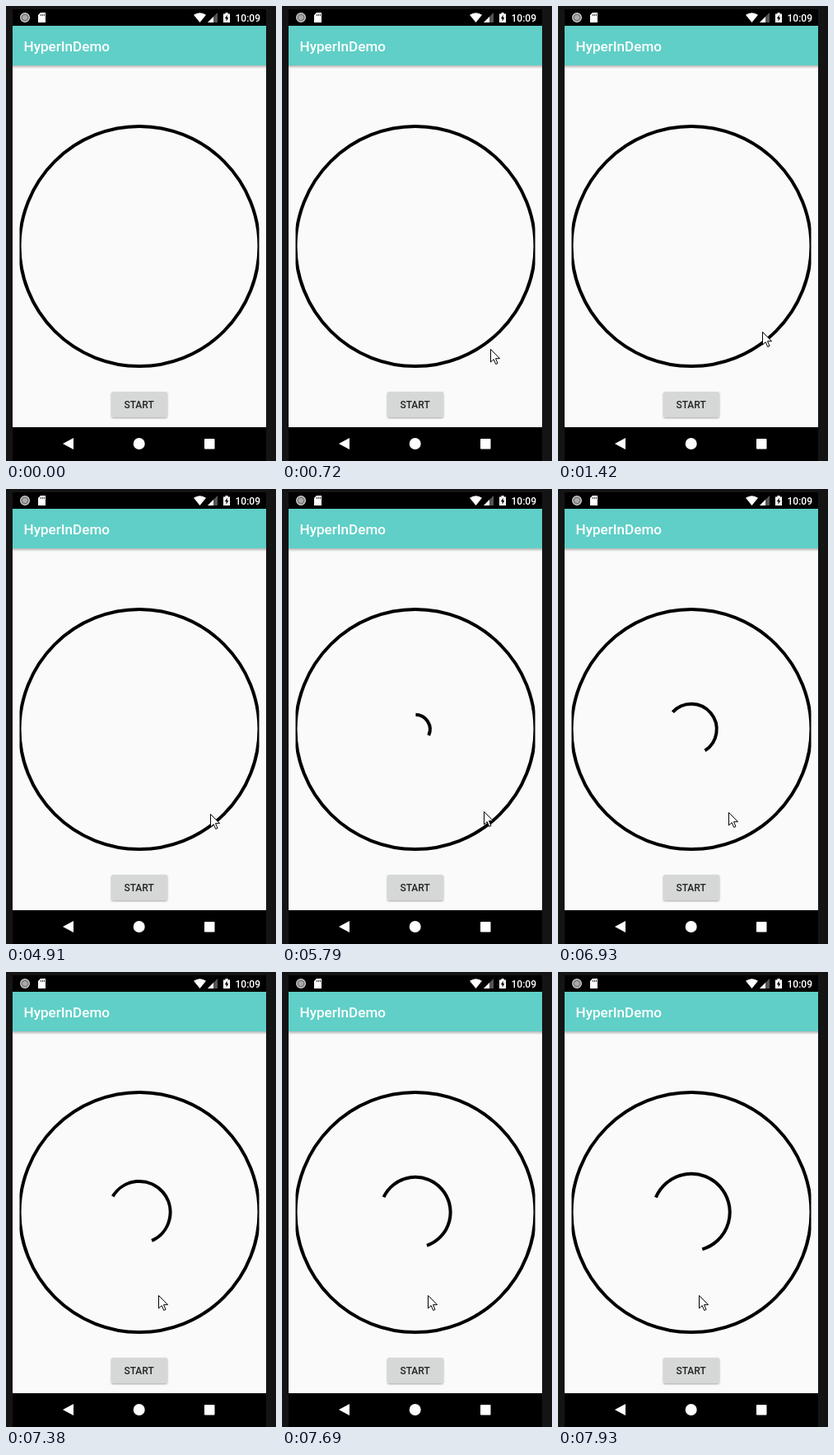
Animation of 328x552 px, one loop 8 s. Source, as an HTML page:

```html
<!DOCTYPE html>
<html lang="en">
<head>
<meta charset="utf-8">
<style>
  html, body { margin: 0; width: 100%; height: 100%; overflow: hidden; background: #141414; }
  svg { display: block; }
  text { font-family: Roboto, sans-serif; font-weight: 500; }
</style>
</head>
<body>
<svg width="328" height="552" viewBox="0 0 328 552">
  <defs>
    <linearGradient id="shade" x2="0" y2="1">
      <stop stop-color="#000" stop-opacity=".28"/>
      <stop offset="1" stop-color="#000" stop-opacity="0"/>
    </linearGradient>
    <filter id="lift" x="-10%" y="-20%" width="120%" height="150%">
      <feDropShadow dx="0" dy="1" stdDeviation=".9" flood-opacity=".35"/>
    </filter>
    <clipPath id="view"><rect x="16.5" y="140" width="291" height="303"/></clipPath>
  </defs>

  <rect width="328" height="552" fill="#141414"/>
  <rect x="8" y="4" width="308" height="548"/>
  <rect x="8" y="72" width="308" height="439" fill="#fafafa"/>
  <rect x="8" y="72" width="308" height="4" fill="url(#shade)"/>
  <rect x="8" y="24" width="308" height="48" fill="#5fcfc7"/>
  <text x="21.5" y="55" font-size="17.1" fill="#fff">HyperInDemo</text>

  <!-- status bar -->
  <circle cx="23" cy="14" r="5.3" fill="#777" stroke="#ccc" stroke-width="1.4"/>
  <circle cx="23" cy="14" r="3" fill="#aaa"/>
  <path d="M42 8H48V20H39V11Z" fill="#fff"/>
  <path d="M42.5 10V12M44.5 10V12M46.5 10V12" stroke="#000" stroke-width=".8"/>
  <path d="M228 10.8Q235.500 5.500 243 10.800L235.500 20Z" fill="#fff"/>
  <path d="M257 8V20H245Z" fill="#555"/>
  <path d="M252 13V20H245Z" fill="#fff"/>
  <path d="M264 9.500H266.500V8H269.500V9.500H272V20H264Z" fill="#fff"/>
  <path d="M268.700 10.800L265.800 15.200H267.600V18.800L270.300 14H268.700Z"/>
  <text x="278.500" y="18.500" font-size="12" fill="#fff">10:09</text>

  <g fill="none" stroke="#000" stroke-width="4">
    <circle cx="162" cy="291.5" r="145.5" clip-path="url(#view)"/>
    <path id="arc"/>
  </g>

  <rect x="128" y="468" width="68" height="31" rx="2" fill="#d6d7d7" filter="url(#lift)"/>
  <text x="161.700" y="488" font-size="12" fill="#222" text-anchor="middle">START</text>

  <!-- navigation bar -->
  <g fill="#fff">
    <path d="M69 531L82 524V538Z"/>
    <circle cx="161.700" cy="531" r="7"/>
    <rect x="241" y="525" width="12.500" height="12.500" rx=".8"/>
  </g>

  <path id="cursor" d="M.5 .5V16L4.200 12.700L6.700 18.500L9 17.500L6.500 11.700H11.500Z"
        fill="#fff" stroke="#000"/>
</svg>
<script>
const LOOP = 8000, STEP = 77, ARC_START = 5602, ENTER = 325;
const arc = document.getElementById('arc');
const cursor = document.getElementById('cursor');

// Cursor drift after the arc appears: [ms, x, y]
const drift = [[5610, 248, 391], [5840, 244, 391], [6300, 242, 391], [6760, 215, 392],
               [6930, 206, 392], [7380, 185, 392], [7930, 171, 392]];

function along(keys, t) {
  const i = keys.findIndex(key => key[0] > t);
  if (i === 0) return keys[0].slice(1);
  if (i < 0) return keys.at(-1).slice(1);
  const a = keys[i - 1], b = keys[i], p = (t - a[0]) / (b[0] - a[0]);
  return [1, 2].map(n => a[n] + (b[n] - a[n]) * p);
}

const stepped = (t, start) => start + Math.floor((t - start) / STEP) * STEP;

function cursorAt(t) {
  if (t < 1190) {
    const p = Math.min(1, (stepped(t, ENTER) - ENTER) / (9 * STEP));
    const left = (1 - p) ** 2;
    return [248 + 27 * left, 397 + 97 * left];
  }
  if (t < 5610) {
    const y = t < 1420 ? 396 : t < 4910 ? 395 : t < 5300 ? 394 : t < 5380 ? 392 : 391;
    return [248, y];
  }
  return along(drift, stepped(t, ARC_START) + 8);
}

function arcPath(t) {
  const u = (stepped(t, ARC_START) - ARC_START) / 1000;
  const r = 16.5 + 8 * u + 2.2 * u * u;
  const from = 280 - 57.5 * u + 10.4 * u * u;
  const to = 379 + 37 * u - 5.8 * u * u;
  const point = deg => {
    const a = deg * Math.PI / 180;
    return `${162 + r * Math.cos(a)} ${291.5 + r * Math.sin(a)}`;
  };
  return `M${point(from)}A${r} ${r} 0 ${to - from > 180 ? 1 : 0} 1 ${point(to)}`;
}

function draw() {
  const t = performance.now() % LOOP;
  const [x, y] = cursorAt(t).map(Math.round);
  cursor.setAttribute('transform', `translate(${x} ${y})`);
  cursor.style.display = t < 330 ? 'none' : '';
  arc.setAttribute('d', t < 5610 ? '' : arcPath(t));
  requestAnimationFrame(draw);
}
draw();
</script>
</body>
</html>
```
